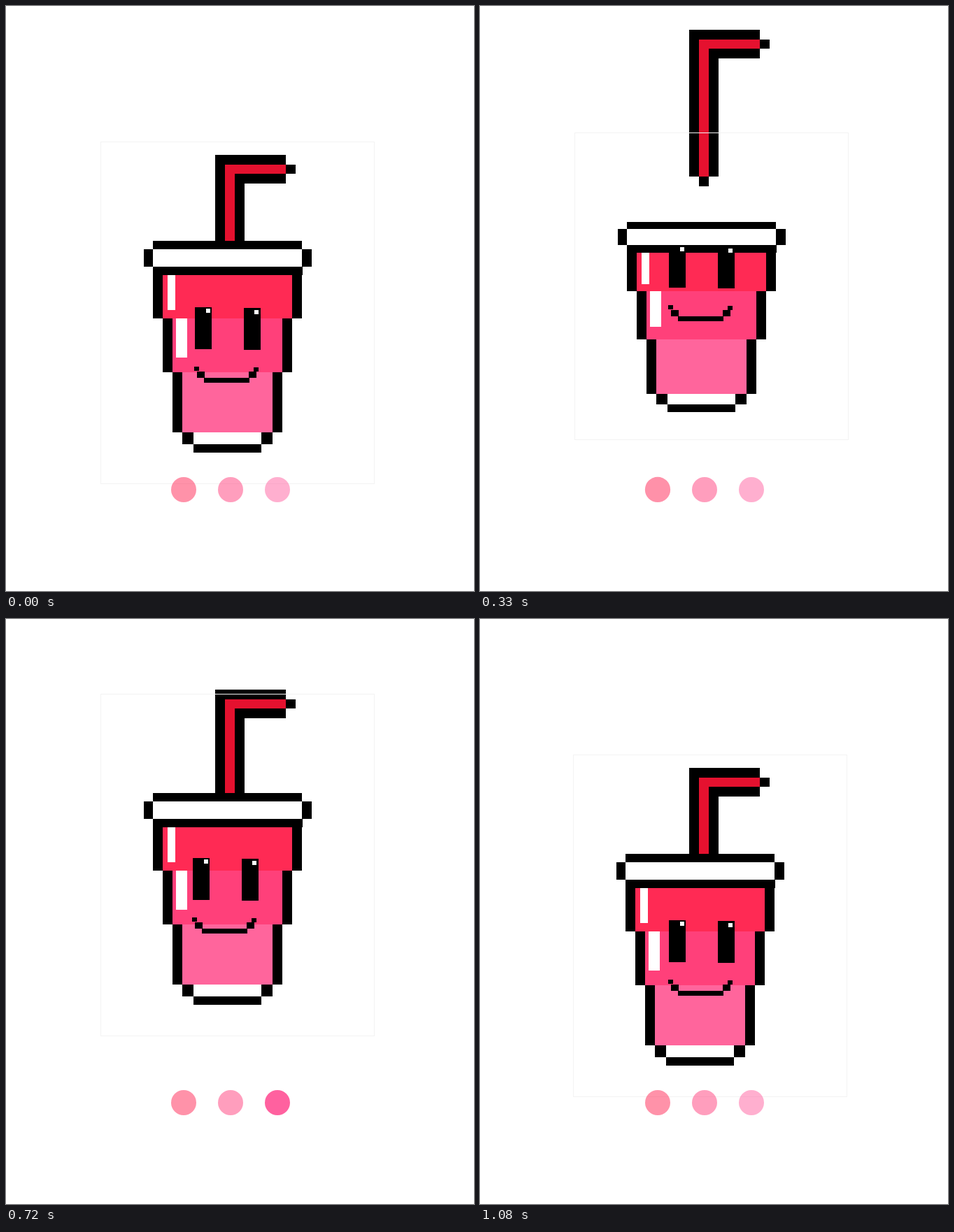
An HTML page with a canvas for the animation above (1.11 s loop, 669 px wide and 837 px high).

```html
<!DOCTYPE html>
<html lang="en">
<head>
<meta charset="utf-8">
<title>Bouncing cup loader</title>
<style>
  html, body { margin: 0; width: 100%; height: 100%; overflow: hidden; background: #fff; }
  canvas { display: block; }
</style>
</head>
<body>
<canvas id="stage" width="669" height="837"></canvas>
<script>
const ctx = document.getElementById('stage').getContext('2d');
const LOOP = 1110, STEP = 30, PART = 12;
const BLACK = '#000', WHITE = '#fff', RED = '#ff2a54', PINK = '#ff407a', ROSE = '#ff659c';
const CUP_MID = 439;

// Each part of the jump holds start, middle and end values.
const PARTS = [
  { straw: [0, 45, -183], cupX: [0, 0, 0], cupY: [0, 30, -39], scale: [1, 0.845, 0.899],
    faceX: [0, 0, 0], faceY: [0, 0, -89], face: true },
  { straw: [-183, -147.5, -112], cupX: [0, 0, 0], cupY: [-39, -116, -87], scale: [0.899, 1, 1],
    face: false },
  { straw: [-112, -56, 0], cupX: [0, -1, -2], cupY: [-87, -21, 0], scale: [1, 1, 1],
    faceX: [-3, -2, 0], faceY: [-89, -28, 0], face: true }
];
const DOTS = [[254, '#ff2755'], [321, '#ff3f7d'], [388, '#ff619f']];

const easeOut = u => Math.sin(u * Math.PI / 2);
const easeInOut = u => u < 0.5
  ? 0.5 * Math.pow(2 * u, 2.3)
  : 1 - 0.5 * Math.pow(2 - 2 * u, 2.3);

function mix([a, b, c], p) {
  return p < 0.5 ? a + (b - a) * p * 2 : b + (c - b) * (p * 2 - 1);
}

// Fills the box between two corners.
function box(color, x1, y1, x2, y2) {
  ctx.fillStyle = color;
  ctx.fillRect(x1, y1, x2 - x1, y2 - y1);
}

function drawStraw(dy) {
  const part = (color, x1, y1, x2, y2) =>
    box(color, x1, Math.round(y1 + dy), x2, Math.round(y2 + dy));
  const red = '#e5112f';
  part(BLACK, 299, 213, 313, 423);
  part(BLACK, 313, 213, 400, 227);
  part(BLACK, 327, 240, 341, 423);
  part(BLACK, 341, 240, 400, 254);
  part(BLACK, 400, 227, 414, 240);
  part(BLACK, 313, 423, 327, 437);
  part(red, 313, 227, 400, 240);
  part(red, 313, 240, 327, 423);
}

function drawCup(dx, dy, scale) {
  const place = y => Math.round(CUP_MID + dy + (y - CUP_MID) * scale);
  const part = (color, x1, y1, x2, y2) =>
    box(color, x1 + dx, place(y1), x2 + dx, place(y2));
  // A body row: dark walls around a coloured fill.
  const row = (color, x1, y1, x2, y2) => {
    part(BLACK, x1, y1, x2, y2);
    part(color, x1 + 14, y1, x2 - 14, y2);
  };

  ctx.strokeStyle = '#f3f3f3';
  ctx.lineWidth = 1;
  ctx.strokeRect(135.5 + dx, place(194) + 0.5, 391, place(684) - place(194) - 1);

  part(BLACK, 210, 336, 423, 348);
  part(BLACK, 197, 348, 437, 373);
  part(WHITE, 210, 348, 423, 373);
  part(BLACK, 210, 373, 424, 385);
  row(RED, 210, 385, 423, 447);
  row(PINK, 224, 447, 409, 524);
  row(ROSE, 238, 524, 395, 610);
  part(WHITE, 231, 385, 242, 435);
  part(WHITE, 243, 447, 259, 503);
  part(BLACK, 252, 610, 381, 627);
  part(WHITE, 268, 610, 365, 627);
  part(BLACK, 268, 627, 365, 639);
}

function drawFace(dx, dy) {
  ctx.save();
  ctx.translate(Math.round(dx), Math.round(dy));
  box(BLACK, 270, 431, 294, 491);
  box(BLACK, 340, 432, 364, 492);
  box(WHITE, 286, 433, 292, 439);
  box(WHITE, 355, 435, 361, 441);
  box(BLACK, 269, 516, 276, 522);
  box(BLACK, 273, 523, 284, 532);
  box(BLACK, 283, 532, 348, 539);
  box(BLACK, 347, 523, 358, 532);
  box(BLACK, 354, 517, 361, 523);
  ctx.restore();
}

function drawDots(active, p) {
  DOTS.forEach(([x, color], i) => {
    const q = i === active ? p : 1;
    const grow = 1 - Math.abs(2 * q - 1);
    ctx.globalAlpha = 1 - 0.5 * q;
    ctx.fillStyle = color;
    ctx.beginPath();
    ctx.arc(x - grow, 692 - 3 * grow, 18 + 9 * grow, 0, Math.PI * 2);
    ctx.fill();
  });
  ctx.globalAlpha = 1;
}

function draw(time) {
  const tick = Math.floor((time % LOOP) / STEP);
  const index = Math.min(2, Math.floor(tick / PART));
  const u = (tick - index * PART) / PART;
  const p = index === 0 ? easeInOut(u) : easeOut(u);
  const part = PARTS[index];

  box(WHITE, 0, 0, 669, 837);
  drawStraw(mix(part.straw, index === 1 ? u : p));
  drawCup(mix(part.cupX, p), mix(part.cupY, p), mix(part.scale, p));
  if (part.face) drawFace(mix(part.faceX, p), mix(part.faceY, p));
  drawDots(tick === 0 ? -1 : index, p);
}

const start = performance.now();
function loop() {
  draw(performance.now() - start);
  requestAnimationFrame(loop);
}
loop();
</script>
</body>
</html>
```
